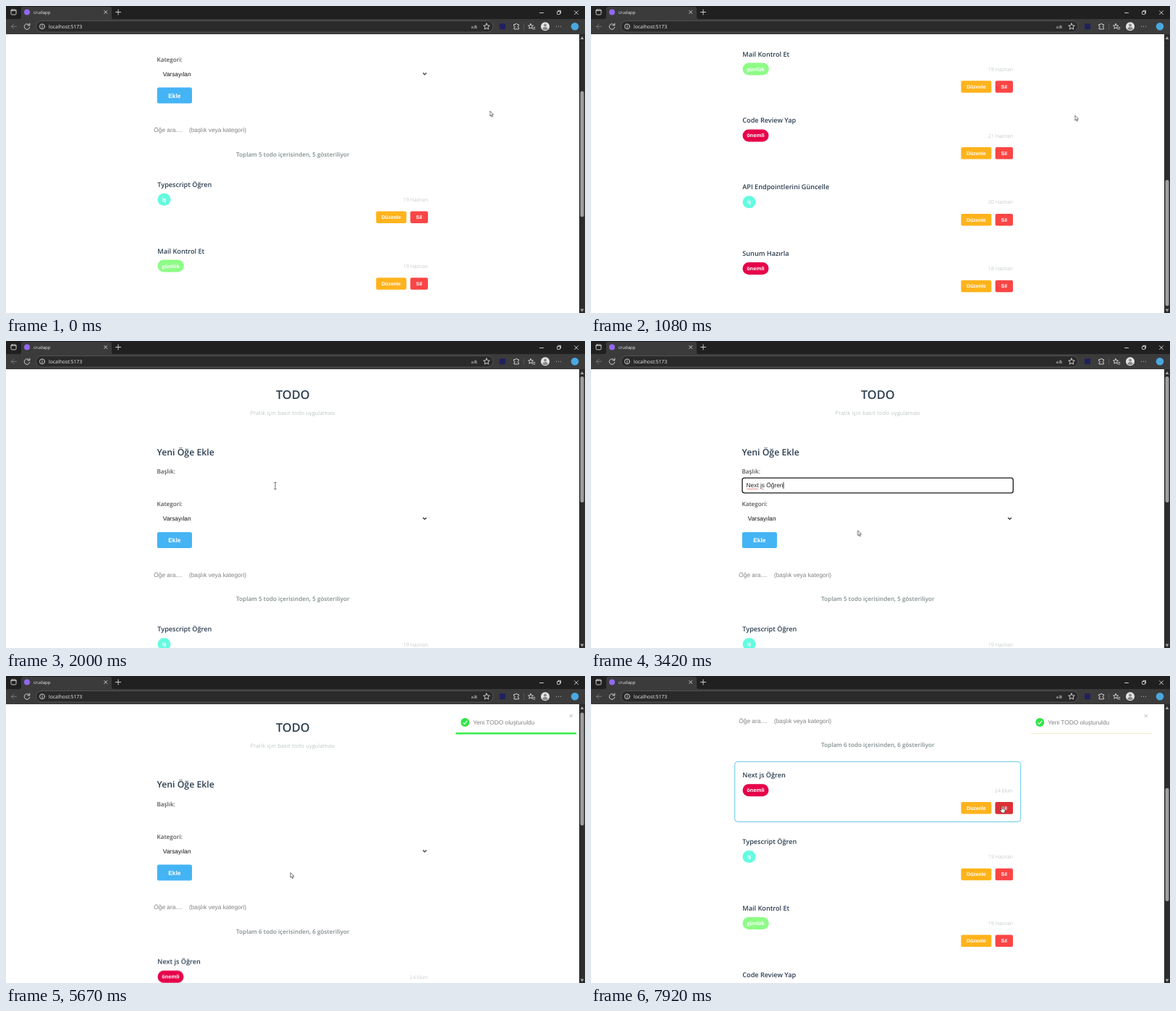
Recreate the animation shown at these times as an HTML page. Size 800x424 px, loop 8000 ms.

```html
<!DOCTYPE html>
<html lang="tr">
<head>
<meta charset="utf-8">
<title>crudapp</title>
<style>
@property --scroll { syntax: "<number>"; inherits: true; initial-value: 151.5; }
@property --ratio { syntax: "<number>"; inherits: true; initial-value: .4517; }

html, body { margin: 0; height: 100%; overflow: hidden; background: #fff; }
svg { display: block; width: 100vw; height: 100vh; }
text { font-family: "Open Sans", "Noto Sans", sans-serif; text-rendering: geometricPrecision; white-space: pre; }
svg .ui { font-family: "Liberation Sans", Arial, sans-serif; font-size: 8.33px; }
.mid { text-anchor: middle; }
.end { text-anchor: end; }
.dark { fill: #2c3e50; font-weight: 600; }
.label { fill: #555; font-weight: 600; font-size: 8.15px; }
.title { font-size: 9.15px; }
.count { fill: #7f8c8d; font-weight: 600; font-size: 8.15px; }
.date { fill: #a9b0b2; font-weight: 300; font-size: 7.1px; }
.badge { fill: #fff; font-weight: 700; font-size: 7.1px; }
svg .btn { fill: #fff; font-weight: 700; font-size: 6.94px; }
.ring { fill: none; stroke: #181818; stroke-width: 1.3; }
.icon { fill: none; stroke: #ddd; stroke-width: .9; stroke-linecap: round; stroke-linejoin: round; }

#stage { animation: scroll 8s linear infinite, ratio 8s step-end infinite; }
#page { transform: translateY(calc(var(--scroll) * -1px)); }
#thumb { height: calc(var(--ratio) * 385px); transform: translateY(calc(var(--scroll) * var(--ratio) * 1px)); }
.step { animation: 8s step-end infinite; }
.before { animation-name: before; }
.after { animation-name: after; }
#older { animation-name: push; }
#inputRing { animation-name: inputRing; }
#caretStart { animation-name: caretStart; }
#caretEnd { animation-name: caretEnd; }
#typed { animation-name: typed; }
#selectRing { animation-name: selectRing; }
#popup { animation-name: popup; }
#mark { animation-name: mark; }
.picked { animation-name: picked; }
.unpicked { animation-name: unpicked; }
#buttonRing { animation-name: buttonRing; }
#hover { animation: hover 8s linear infinite; }
#press { animation: press 8s linear infinite; }
#cursor { animation: move 8s linear infinite; }
#arrow { animation-name: arrow; }
#beam { animation-name: beam; }
#hand { animation-name: hand; }
#toast { animation: toast 8s linear infinite; }
#bar { transform-origin: 617px 0; animation: drain 8s linear infinite; }

@keyframes scroll {
  0%, 1% { --scroll: 151.5; animation-timing-function: ease-out; }
  8.3%, 10.3% { --scroll: 340; animation-timing-function: ease-out; }
  13.25%, 13.9% { --scroll: 423.5; }
  17.75% { --scroll: 103; animation-timing-function: ease-out; }
  20%, 70.5% { --scroll: 0; }
  70.87% { --scroll: 3; animation-timing-function: ease-out; }
  74.4% { --scroll: 52; animation-timing-function: ease-in-out; }
  78.7% { --scroll: 104; animation-timing-function: ease-in-out; }
  84.5%, 86% { --scroll: 156.5; animation-timing-function: ease-in-out; }
  90.6% { --scroll: 208.5; animation-timing-function: ease-in-out; }
  96.8%, 100% { --scroll: 261; }
}
@keyframes ratio { 0% { --ratio: .4517; } 66.5%, 100% { --ratio: .4056; } }
@keyframes before { 0% { opacity: 1; } 66.5%, 100% { opacity: 0; } }
@keyframes after { 0% { opacity: 0; } 66.5%, 100% { opacity: 1; } }
@keyframes push { 0% { transform: none; } 66.5%, 100% { transform: translateY(91.8px); } }
@keyframes inputRing { 0%, 45.8%, 100% { opacity: 0; } 29.1% { opacity: 1; } }
@keyframes caretStart { 0%, 36.45%, 100% { opacity: 0; } 31.2% { opacity: 1; } }
@keyframes caretEnd { 0%, 45.8%, 100% { opacity: 0; } 36.45% { opacity: 1; } }
@keyframes typed { 0%, 66.5%, 100% { opacity: 0; } 36.45% { opacity: 1; } }
@keyframes selectRing { 0%, 64.6%, 100% { opacity: 0; } 45.8% { opacity: 1; } }
@keyframes popup { 0%, 57.2%, 100% { opacity: 0; } 45.8% { opacity: 1; } }
@keyframes mark { 0%, 100% { transform: none; } 52.1% { transform: translateY(14.25px); } }
@keyframes picked { 0%, 66.5%, 100% { opacity: 0; } 57.2% { opacity: 1; } }
@keyframes unpicked { 0%, 66.5%, 100% { opacity: 1; } 57.2% { opacity: 0; } }
@keyframes buttonRing { 0%, 66.5%, 100% { opacity: 0; } 64.6% { opacity: 1; } }
@keyframes hover { 0%, 78.3% { opacity: 0; } 80.5%, 100% { opacity: 1; } }
@keyframes press { 0%, 95% { opacity: 0; } 97%, 100% { opacity: 1; } }
@keyframes move {
  0%, 10.3% { transform: translate(668.5px, 145px); }
  12.5%, 20.5% { transform: translate(668.5px, 151px); animation-timing-function: ease-in-out; }
  25%, 41.6% { transform: translate(372px, 200px); }
  42.7% { transform: translate(368.5px, 262px); }
  45.4% { transform: translate(372px, 246px); }
  47.8%, 49.9% { transform: translate(372px, 250px); animation-timing-function: ease-in-out; }
  54.1%, 79% { transform: translate(393px, 271.5px); animation-timing-function: ease-in-out; }
  84.8%, 86% { transform: translate(425.5px, 293px); animation-timing-function: ease-in-out; }
  95.6%, 100% { transform: translate(567px, 180px); }
}
@keyframes arrow { 0%, 41.6% { opacity: 1; } 24.4%, 95%, 100% { opacity: 0; } }
@keyframes beam { 0%, 41.6%, 100% { opacity: 0; } 24.4% { opacity: 1; } }
@keyframes hand { 0% { opacity: 0; } 95%, 100% { opacity: 1; } }
@keyframes toast {
  0%, 64.1% { transform: translateX(1560px); animation-timing-function: cubic-bezier(.215, .61, .355, 1); }
  69.4% { transform: translateX(-13px); animation-timing-function: ease-out; }
  70.7% { transform: translateX(5px); }
  70.95% { transform: translateX(4px); }
  72% { transform: translateX(-2.6px); }
  72.9%, 97.5% { transform: none; animation-timing-function: ease-out; }
  99.2% { transform: translateX(-10px); animation-timing-function: ease-in; }
  100% { transform: translateX(-3px); }
}
@keyframes drain { 0%, 72.9% { transform: none; } 97.9%, 100% { transform: scaleX(0); } }
</style>
</head>
<body>
<svg id="stage" viewBox="0 0 800 424" preserveAspectRatio="none">
  <g id="page">
    <text class="dark mid" x="396.3" y="80" font-size="16.4">TODO</text>
    <text class="mid" x="396.3" y="102" font-size="7.5" font-weight="300" letter-spacing=".3" fill="#98a3a5">Pratik için basit todo uygulaması</text>
    <text class="dark" x="208.5" y="157.5" font-size="12.3">Yeni Öğe Ekle</text>

    <text class="label" x="208.5" y="183">Başlık:</text>
    <rect id="inputRing" class="ring step" x="209" y="189.2" width="374.3" height="20.6" rx="3"/>
    <g id="typed" class="step">
      <text class="ui" x="214.5" y="202.3" fill="#222">Next js Öğren</text>
      <path d="M215 204.4q1-1 2 0t2 0t2 0t2 0t2 0t2 0t2 0t2 0M235 204.4q1-1 2 0t2 0" fill="none" stroke="#e0303a" stroke-width=".6"/>
    </g>
    <path id="caretStart" class="step" d="M214.6 195v9" stroke="#000" stroke-width=".8"/>
    <path id="caretEnd" class="step" d="M266 195v9" stroke="#000" stroke-width=".8"/>

    <text class="label" x="208.5" y="228.3">Kategori:</text>
    <text class="ui step unpicked" x="216.8" y="248.2" fill="#111">Varsayılan</text>
    <text class="ui step picked" x="216.8" y="248.2" fill="#111">Önemli</text>
    <path d="M576.2 244l2.3 2.3 2.3-2.3" fill="none" stroke="#111" stroke-width="1.1"/>
    <rect id="selectRing" class="ring step" x="209" y="234.7" width="374.3" height="20.6" rx="3"/>

    <rect x="208.8" y="264" width="48.2" height="22" rx="2.5" fill="#45b4f5"/>
    <text class="ui mid" x="232.8" y="278" font-weight="700" fill="#fff">Ekle</text>
    <rect id="buttonRing" class="ring step" x="208.5" y="263.4" width="48.8" height="23.2" rx="3"/>

    <text class="ui" x="204.3" y="325.8" fill="#808080">Öğe ara....    (başlık veya kategori)</text>
    <text class="count mid step before" x="396.3" y="359.4">Toplam 5 todo içerisinden, 5 gösteriliyor</text>
    <text class="count mid step after" x="396.3" y="359.4">Toplam 6 todo içerisinden, 6 gösteriliyor</text>

    <g id="newest" class="step after"></g>
    <g id="older" class="step"></g>
    <rect id="hover" x="198.7" y="379.3" width="395" height="83" rx="4" fill="none" stroke="#62c5e8" stroke-width="1"/>

    <g id="popup" class="step">
      <rect x="208.5" y="256.5" width="375" height="57" fill="#fff" stroke="#767676" stroke-width=".7"/>
      <rect id="mark" class="step" x="209" y="256.5" width="374" height="14.25" fill="#c9d9f0"/>
      <g id="options" fill="#111"></g>
    </g>
  </g>

  <g id="toast">
    <rect x="617" y="47" width="167" height="33.5" rx="2" fill="#fff"/>
    <path d="M617.5 79.5h166" stroke="#f6ecc4" stroke-width="1.2"/>
    <rect id="bar" x="617" y="78" width="167" height="2.5" rx="1" fill="#38ec4c"/>
    <circle cx="630" cy="64" r="6" fill="#2fe645"/>
    <path d="M627.2 64.3l2 2 3.7-4.4" fill="none" stroke="#fff" stroke-width="1.2"/>
    <text class="ui" x="641" y="67" fill="#808080">Yeni TODO oluşturuldu</text>
    <path d="M774.5 53l4 4m0-4l-4 4" stroke="#aaa" stroke-width=".8"/>
  </g>

  <g id="scrollbar">
    <path d="M792 39h8v385h-8z" fill="#2c2c2c"/>
    <path d="M793.6 46l2.4-4 2.4 4zM793.6 418.500l2.4 4 2.4-4z" fill="#a8a8a8"/>
    <rect id="thumb" x="793.5" y="49" width="5" rx="2.5" fill="#9f9f9f"/>
  </g>

  <g id="chrome">
    <path d="M0 0h800v39H0z" fill="#3b3b3b"/>
    <path d="M0 0h800v18H0z" fill="#202020"/>
    <path d="M18 18q3 0 3-3V4q0-3 3-3h119q3 0 3 3v11q0 3 3 3z" fill="#3b3b3b"/>
    <rect x="7" y="5" width="7" height="7" rx="1.3" class="icon"/>
    <path d="M7 6.300h7" class="icon" stroke-width="1.6"/>
    <circle cx="29" cy="8.500" r="4" fill="#9068f0"/>
    <text x="38" y="11" font-size="6" fill="#eee">crudapp</text>
    <path d="M135.700 6.500l4 4m0-4l-4 4M155 5v7M151.500 8.500h7" class="icon"/>
    <path d="M737.500 9.500h5M785.500 6.700l5 5m0-5l-5 5" class="icon" stroke-width=".7"/>
    <rect x="761.500" y="7.500" width="4" height="4" rx=".7" class="icon" stroke-width=".7"/>
    <path d="M763 6.300h3.500v3.500" class="icon" stroke-width=".7"/>

    <rect x="41.500" y="20.500" width="631.500" height="15.500" rx="7.700" fill="#2a2a2a" stroke="#626262" stroke-width=".7"/>
    <path d="M14.500 28.300h-7m3.300-3.300l-3.300 3.300 3.300 3.300" class="icon" opacity=".4"/>
    <path d="M32.300 26.500a3.800 3.800 0 1 0 .5 2.800M32.800 24v2.800h-2.800" class="icon"/>
    <circle cx="50" cy="28.300" r="3.500" class="icon" stroke-width=".7"/>
    <path d="M50 28v2M50 26.400v.1" class="icon"/>
    <text x="59" y="31" font-size="6.850" fill="#f0f0f0">localhost:5173</text>
    <text x="642.500" y="30.700" font-size="5.800" fill="#ccc" style="font-family:'Noto Sans CJK JP','Noto Sans CJK',sans-serif">aあ</text>
    <path d="M664 24l1.300 2.800 3 .3-2.300 2 .7 3-2.700-1.600-2.700 1.600.7-3-2.300-2 3-.3z" class="icon" stroke-width=".7"/>
    <rect x="682" y="24.300" width="8" height="8" rx="1" fill="#20205c"/>
    <path d="M702 25.500h2a1.200 1.200 0 0 1 2.400 0h2v2a1.200 1.200 0 0 0 0 2.400v2h-6.400v-2a1.200 1.200 0 0 0 0-2.400z" class="icon"/>
    <path d="M715.500 24v9" stroke="#626262" stroke-width=".7"/>
    <path d="M725 24.500l1 2.300 2.500.2-1.900 1.700.6 2.500-2.200-1.300-2.200 1.300.6-2.500-1.900-1.700 2.500-.2zM728.800 29.500h2M728 31.800h2.800" class="icon" stroke-width=".8"/>
    <circle cx="745" cy="28.300" r="6" fill="#e4e4e4"/>
    <circle cx="745" cy="26.500" r="2" fill="#8a8a8a"/>
    <path d="M741.300 32a3.700 3 0 0 1 7.400 0q-3.700 2.500-7.400 0z" fill="#8a8a8a"/>
    <path d="M760.500 28.300h.1M763.500 28.300h.1M766.500 28.300h.1" class="icon" stroke-width="1.400"/>
    <circle cx="786" cy="28.300" r="5.300" fill="#4aa8e0"/>
  </g>

  <g id="cursor" stroke="#333" stroke-width=".7" stroke-linejoin="round">
    <path id="arrow" class="step" d="M0 0v7l1.600-1.400 1.100 2.500 1.200-.5-1.100-2.500h2.200z" fill="#fff"/>
    <path id="beam" class="step" d="M-1.500-4.500h3M0-4.500v9M-1.500 4.500h3" fill="none"/>
    <path id="hand" class="step" d="M0 0q1-.8 1.400.3V3.500l3 .7q1 .3.800 1.500L4.500 9H.6L-2 5.500q0-1.200 1-.7L0 5.500z" fill="#fff"/>
  </g>
</svg>
<script>
const badges = {
  "iş": { width: 18, color: "#64fbe0" },
  "günlük": { width: 36.3, color: "#8dfc85" },
  "önemli": { width: 36, color: "#e6004a" },
};

const card = ([title, category, date], index) => {
  const { width, color } = badges[category];
  return `<g transform="translate(0 ${398 + index * 91.8})">
    <text class="dark title" x="209.300" y="3.200">${title}</text>
    <rect x="209.500" y="12.300" width="${width}" height="17" rx="8.500" fill="${color}"/>
    <text class="badge mid" x="${209.5 + width / 2}" y="23.300">${category}</text>
    <text class="date end" x="583" y="23.500">${date}</text>
    <rect x="511.300" y="37" width="42" height="16.500" rx="2.200" fill="#ffb31c"/>
    <text class="ui btn mid" x="532.300" y="47.700">Düzenle</text>
    <rect x="558.600" y="37" width="24.400" height="16.500" rx="2.200" fill="#fb4545"/>
    ${date === "24 Ekim" ? '<rect id="press" x="558.600" y="37" width="24.400" height="16.500" rx="2.200" fill="#dc2f36"/>' : ""}
    <text class="ui btn mid" x="570.800" y="47.700">Sil</text>
  </g>`;
};

const fill = (id, markup) => { document.getElementById(id).innerHTML = markup; };

fill("newest", card(["Next js Öğren", "önemli", "24 Ekim"], 0));
fill("older", [
  ["Typescript Öğren", "iş", "19 Haziran"],
  ["Mail Kontrol Et", "günlük", "19 Haziran"],
  ["Code Review Yap", "önemli", "21 Haziran"],
  ["API Endpointlerini Güncelle", "iş", "20 Haziran"],
  ["Sunum Hazırla", "önemli", "18 Haziran"],
].map(card).join(""));
fill("options", ["Varsayılan", "Önemli", "İş", "Günlük"]
  .map((name, i) => `<text class="ui" x="216.800" y="${266.6 + i * 14.25}">${name}</text>`).join(""));
</script>
</body>
</html>
```
